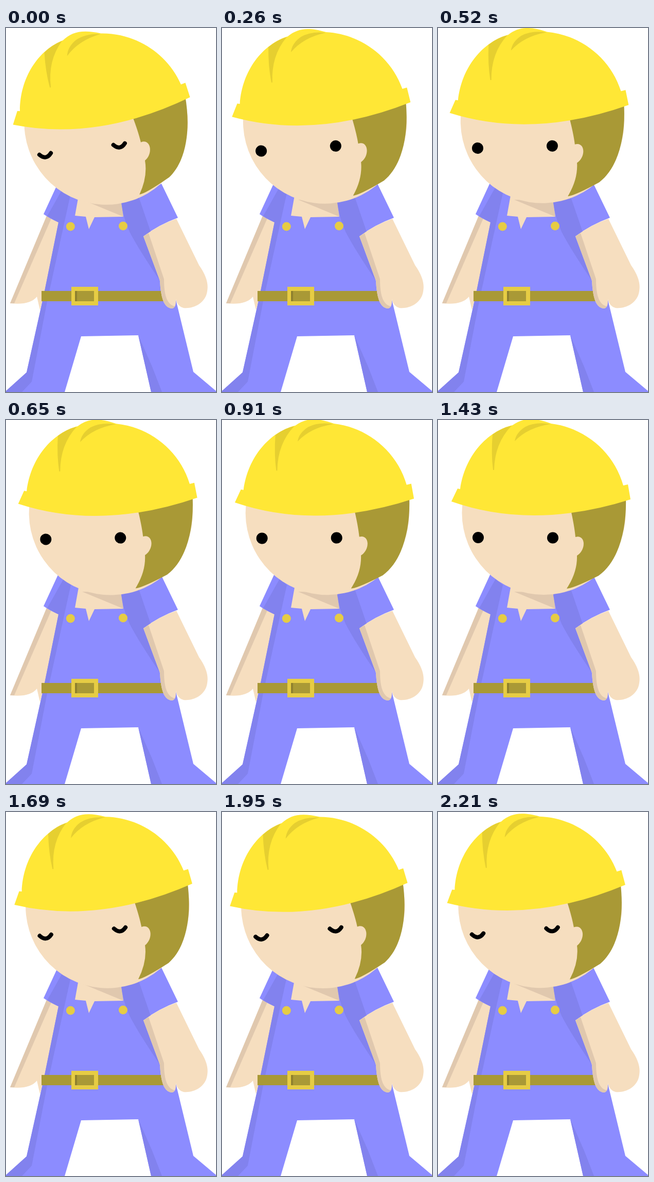
Write an HTML page that moves like this. It is 408 px wide and 706 px high and loops after 2340 ms.

```html
<!DOCTYPE html>
<html lang="en">
<head>
<meta charset="utf-8">
<title>Sleepy builder</title>
<style>
  html, body { margin: 0; width: 100%; height: 100%; overflow: hidden; background: #fff; }
  svg { display: block; width: 408px; height: 706px; }
  .skin { fill: #f6debf; }
  .skin-shade { fill: #e0c8ae; }
  .cloth { fill: #8c8cff; }
  .cloth-shade { fill: #8282ee; }
  .olive { fill: #a99936; }
  .brass { fill: #e6cc44; }
  .hat { fill: #ffe736; }
  .hat-shade { fill: #e6cf30; }
  .closed { fill: none; stroke: #000; stroke-width: 8; stroke-linecap: round; }
</style>
</head>
<body>
<svg viewBox="0 0 408 706">
  <!-- left arm and neck -->
  <path class="skin" d="M80 362L8 534Q47 538 60 521L66 547L76 510L104 374Z"/>
  <path class="skin-shade" d="M80 362L89 367L16 534L8 534Z"/>
  <path class="skin" d="M130 366L140 315H230V368L180 392H158Z"/>
  <path class="skin-shade" d="M148 333L228 366L224 335Z"/>

  <!-- overalls -->
  <path class="cloth" d="M104 294L73 361Q86 370 102 377L75 510L40 668L0 704V706H114L146 598L257 596L282 706H408V704L364 667L330 527L305 520L299 490L267 404Q298 381 334 368L302 302L224 338L228 366L172 367L161 390L155 366L134 364L141 325Z"/>
  <path class="cloth-shade" d="M112 308L80 365Q92 372 102 377L72 525L40 668L0 704V706H31L50 686L81 525L126 320Z"/>
  <path class="cloth-shade" d="M224 338L258 328L281 395L267 404L299 490Q255 425 240 395Q228 370 224 338Z"/>
  <path class="cloth-shade" d="M257 596L282 706H303L284 657Z"/>
  <circle class="brass" cx="125.3" cy="385" r="8.5"/>
  <circle class="brass" cx="227.5" cy="384" r="8.5"/>

  <!-- belt -->
  <path class="olive" d="M69 510H306V530H69Z"/>
  <path class="brass" d="M127 502H179V538H127Z"/>
  <path class="olive" d="M134 510H171V530H134Z"/>
  <path fill="#8f812e" d="M134 510H138V530H134Z"/>

  <!-- right arm -->
  <path class="skin" d="M267 404Q298 381 331 370L375 460Q395 488 391 510C388 535 362 545 345 543Q333 540 330 526Q331 543 322 544C307 542 301 525 299 490Z"/>
  <path class="skin-shade" d="M267 404L277 398L307 487C307 520 313 536 328 540Q326 544 322 544C307 542 301 525 299 490Z"/>

  <g id="head">
    <circle class="skin" cx="205.5" cy="180" r="159"/>
    <path class="olive" d="M257 170Q265 205 267 227C278 224 283 232 283 240C283 250 277 259 270 263Q271 295 250 327Q262 327 312 302C350 275 367 215 365 150Z"/>
    <g id="open">
      <circle cx="78" cy="228" r="11"/>
      <circle cx="223" cy="228.5" r="11"/>
    </g>
    <g id="closed" class="closed">
      <path d="M68.5 223Q80 236 91 223"/>
      <path d="M213.5 224.5Q225 237.5 236 224.5"/>
    </g>
    <path class="hat" d="M26 158L38 133L43 134C52 70 95 22 145 10C165 -4 185 -6 220 7C285 15 342 62 360 127L369 125L374 154Q185 214 26 158Z"/>
    <path class="hat-shade" d="M106 28Q124 15 143 11Q110 45 109 97H107Q103 65 106 28Z"/>
    <path class="hat-shade" d="M149 41Q152 24 170 13Q190 3 219 8Q175 14 149 41Z"/>
  </g>
</svg>
<script>
  const STEP = 130, STEPS = 18;
  const LOW = -8.12;
  const head = document.getElementById("head");
  const open = document.getElementById("open");
  const closed = document.getElementById("closed");

  const settle = (from, to, n) => to + (from - to) * 0.71 ** n;

  // Wake with a jerk, nod off, then take one half-raised breath.
  function tilt(n) {
    if (n < 12) return settle(LOW, 0.19, n);
    if (n < 14) return -3.06 * (n - 11);
    return settle(LOW, -3.5, n - 14);
  }

  function draw(time) {
    const n = Math.floor(time / STEP) % STEPS;
    const awake = n > 0 && n < 12;
    head.setAttribute("transform", `rotate(${tilt(n)} 227 260)`);
    open.style.display = awake ? "" : "none";
    closed.style.display = awake ? "none" : "";
  }

  const start = performance.now();
  function tick() {
    draw(performance.now() - start);
    requestAnimationFrame(tick);
  }
  tick();
</script>
</body>
</html>
```
